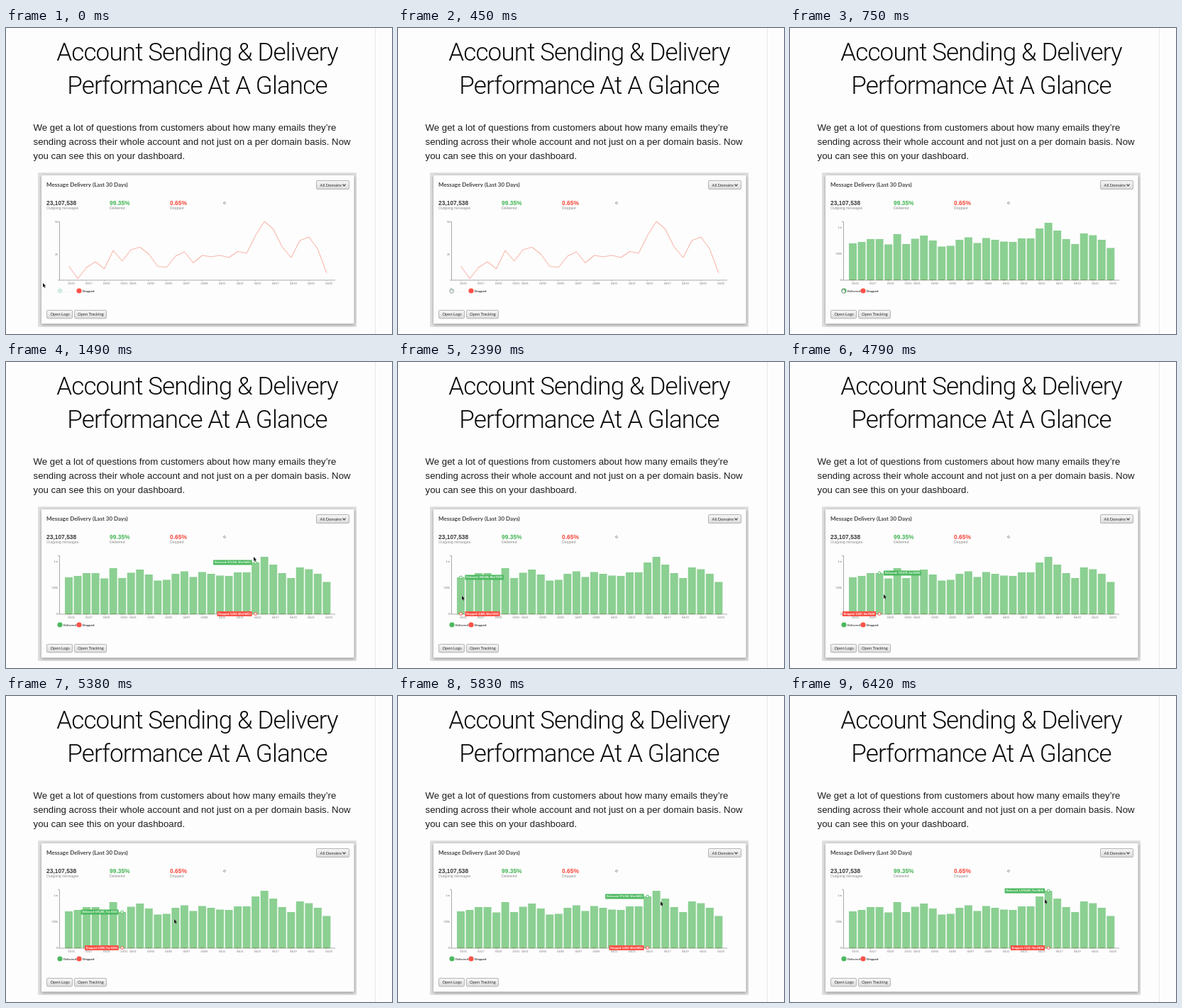
Recreate the animation shown at these times as an HTML page with a canvas. Size 544 px wide and 432 px high, loop 8 s.

```html
<!DOCTYPE html>
<html lang="en">
<head>
<meta charset="utf-8">
<title>Message delivery</title>
<style>
html, body { margin: 0; width: 100%; height: 100%; overflow: hidden; background: #fdfdfd; }
canvas { display: block; width: 544px; height: 432px; }
</style>
</head>
<body>
<canvas id="stage"></canvas>
<script>
const W = 544, H = 432, LOOP = 8000, STEP = 146.6, SWITCH = 750;
const SANS = '"Liberation Sans", Arial, sans-serif';
const LATO = 'Lato, sans-serif';
const GREEN = '#4cb95f', RED = '#fb5147';
const BASE = 355.5;

const canvas = document.getElementById('stage');
const ctx = canvas.getContext('2d');
const dpr = window.devicePixelRatio || 1;
canvas.width = W * dpr;
canvas.height = H * dpr;

const barTops = [304, 302, 298, 298, 305.5, 291, 305, 297.5, 293, 300, 308.5, 307.5, 299, 295.5, 303.5,
  296.5, 299, 301.5, 302, 297, 297, 283, 275, 286, 298, 305, 290, 292.5, 299, 310.5];
const linePoints = [336, 354, 338, 330, 340, 314, 329, 313, 309.5, 319, 336.5, 338, 322, 316, 331.5,
  321, 323, 321, 324, 315.5, 318, 293, 273, 284, 309, 324, 300, 295, 312, 346];
const barX = i => 88.5 + i * 12.53;

// Pointer legs: start time, steps, end x, end y, hovered bar (-1 for none)
const legs = [
  [0, 1, 52, 360, -1],
  [150, 3, 75, 368, -1],
  [1050, 1, 58, 364, -1],
  [1197, 1, 112, 345, 2],
  [1343, 2, 349, 275, 21],
  [2090, 1, 452, 240, 29],
  [2237, 1, 300, 368, 17],
  [2385, 1, 90, 330, 0],
  [2990, 3, 106, 328, 1],
  [3590, 1, 108, 326, 1],
  [3737, 3, 130, 328, 3],
  [4790, 1, 132, 328, 3],
  [4937, 4, 237, 315, 6],
  [5523, 3, 370, 290, 21],
  [5980, 1, 366, 290, 23],
  [6127, 3, 359, 287, 22]
];

function pointerAt(t) {
  const n = legs.findLastIndex(leg => leg[0] <= t);
  const [start, steps, ...to] = legs[n];
  const from = n ? legs[n - 1].slice(2) : to;
  const k = Math.min(steps, Math.floor((t - start) / STEP) + 1) / steps;
  const [x, y, bar] = to.map((v, i) => from[i] + (v - from[i]) * k);
  return { x, y, bar: Math.round(bar) };
}

function text(str, x, y, font, color, align = 'left', spacing = 0) {
  ctx.font = font;
  ctx.fillStyle = color;
  ctx.textAlign = align;
  ctx.letterSpacing = spacing + 'px';
  ctx.fillText(str, x, y);
}

function rect(x, y, w, h, color) {
  ctx.fillStyle = color;
  ctx.fillRect(x, y, w, h);
}

function path(points, color, width = 1) {
  ctx.beginPath();
  points.forEach(([x, y]) => ctx.lineTo(x, y));
  ctx.strokeStyle = color;
  ctx.lineWidth = width;
  ctx.stroke();
}

function dot(x, y, r, fill, stroke) {
  ctx.beginPath();
  ctx.arc(x, y, r, 0, Math.PI * 2);
  ctx.fillStyle = fill;
  ctx.fill();
  if (stroke) {
    ctx.strokeStyle = stroke;
    ctx.lineWidth = 1;
    ctx.stroke();
  }
}

function button(x, y, w, h, label, tx) {
  const shade = ctx.createLinearGradient(0, y, 0, y + h);
  shade.addColorStop(0, '#f8f8f8');
  shade.addColorStop(1, '#d9d9d9');
  ctx.beginPath();
  ctx.roundRect(x + 0.5, y + 0.5, w - 1, h - 1, 1.5);
  ctx.fillStyle = shade;
  ctx.fill();
  ctx.strokeStyle = '#b5b5b5';
  ctx.lineWidth = 1;
  ctx.stroke();
  text(label, tx, y + h / 2 + 2, '5.8px ' + LATO, '#333');
}

function drawPage() {
  rect(0, 0, W, H, '#fdfdfd');
  rect(520, 0, 1, H, '#e6e6e6');
  const title = '300 35px Roboto, sans-serif';
  text('Account Sending & Delivery', 269.5, 46, title, '#0c0c0c', 'center', -0.85);
  text('Performance At A Glance', 269.5, 93, title, '#0c0c0c', 'center', -0.85);
  ['We get a lot of questions from customers about how many emails they’re',
    'sending across their whole account and not just on a per domain basis. Now',
    'you can see this on your dashboard.'
  ].forEach((s, i) => text(s, 38.5, 144.5 + i * 20, '13.25px ' + SANS, '#1c1c1c'));
}

function drawPanel() {
  rect(45, 204, 449, 218, '#e1e1e1');
  ctx.save();
  ctx.shadowColor = 'rgba(0,0,0,.35)';
  ctx.shadowBlur = 4 * dpr;
  ctx.shadowOffsetY = dpr;
  rect(50, 208, 440.5, 209.5, '#fdfdfd');
  ctx.restore();

  text('Message Delivery (Last 30 Days)', 57, 223.5, 'bold 8px ' + LATO, '#444');
  button(437, 215, 47, 13, 'All Domains', 442.5);
  path([[474.5, 220.5], [476.5, 223], [478.5, 220.5]], '#333', 1.2);
  button(57, 398, 37, 12.5, 'Open Logs', 62.5);
  button(96, 398, 46, 12.5, 'Open Tracking', 101);

  [[57, '23,107,538', 'Outgoing messages', '#3c3c3c'],
    [146, '99.35%', 'Delivered', '#45b656'],
    [231, '0.65%', 'Dropped', '#f8463b']
  ].forEach(([x, value, label, color]) => {
    text(value, x, 250, 'bold 8.45px ' + SANS, color);
    text(label, x, 256, '5.1px ' + SANS, '#8a8a8a');
  });
  dot(308, 247, 1.5, '#f4f4f4', '#aaa');
}

function drawAxes(labels) {
  path([[73, 273.5], [75.5, 273.5], [75.5, 356], [73, 356]], '#aaa');
  path([[75.5, 356], [464, 356]], '#aaa');
  const font = '3.9px ' + SANS;
  labels.forEach(([s, y]) => text(s, 73, y + 1.5, font, '#777', 'right'));
  for (let i = 0; i < 16; i++) {
    const date = i < 4 ? '03/' + (25 + i * 2) : '04/' + String(i * 2 - 7).padStart(2, '0');
    const x = i < 4 ? 92 + i * 24.8 : 179 + (i - 4) * 25.1;
    rect(x - 3.5, 356, 0.8, 2, '#bbb');
    text(date, x, 362, font, '#777', 'center');
  }
}

function drawLegend(on) {
  const font = 'bold 4px ' + SANS;
  ctx.globalAlpha = on ? 1 : 0.25;
  dot(76, 371, 3.6, on ? GREEN : '#58b79b');
  text(on ? 'Delivered' : '– – – –', 81, 372.5, font, on ? '#444' : '#888');
  ctx.globalAlpha = 1;
  dot(103, 371, 3.6, RED);
  text('Dropped', 108, 372.5, font, '#333');
}

function drawLine() {
  drawAxes([['5k', 273], ['2k', 319]]);
  ctx.lineJoin = 'round';
  path(linePoints.map((y, i) => [barX(i), y]), '#f9b8ad', 1.1);
}

function drawBars() {
  drawAxes([['1m', 281], ['500k', 318], ['0', 355.5]]);
  barTops.forEach((top, i) => {
    rect(barX(i) - 5.5, top, 11, 356 - top, '#8bd092');
    rect(barX(i) - 4, 355, 8, 1, '#7d9f62');
  });
}

function drawTip(label, x, y, color) {
  ctx.font = 'bold 3.6px ' + SANS;
  ctx.letterSpacing = '0px';
  const w = ctx.measureText(label).width + 3.6;
  const left = x - 5 - w < 70 ? x + 6 : x - 5 - w;
  rect(left, y - 3.5, w, 7, color);
  text(label, left + 1.8, y + 1.3, ctx.font, '#fff');
  dot(x, y, 1.9, '#fff', color);
}

function drawTips(i) {
  const days = ['Wed', 'Thu', 'Fri', 'Sat', 'Sun', 'Mon', 'Tue'];
  const date = i < 7 ? '03/' + (25 + i) : '04/' + String(i - 6).padStart(2, '0');
  const day = days[i % 7] + ' ' + date;
  const sent = Math.round((BASE - barTops[i]) * 13387 + i * 37 + 215);
  const lost = Math.round(1000 + (356 - linePoints[i]) * 73 + i * 3);
  drawTip(`Delivered: ${sent.toLocaleString('en-US')}, ${day}`, barX(i), barTops[i], GREEN);
  drawTip(`Dropped: ${lost.toLocaleString('en-US')}, ${day}`, barX(i), BASE, RED);
}

function drawPointer(x, y, hand) {
  ctx.save();
  ctx.translate(x, y);
  ctx.beginPath();
  if (hand) {
    ctx.roundRect(-1.7, 1.5, 4.4, 4.5, 1.5);
    ctx.roundRect(-0.6, 0, 1.3, 4, 0.6);
  } else {
    [[0, 0], [0, 6], [1.4, 4.8], [2.4, 7], [3.3, 6.6], [2.4, 4.5], [4.2, 4.3]]
      .forEach(([px, py]) => ctx.lineTo(px, py));
    ctx.closePath();
  }
  ctx.lineWidth = 0.8;
  ctx.strokeStyle = hand ? '#333' : 'rgba(255,255,255,.7)';
  ctx.stroke();
  ctx.fillStyle = hand ? '#e8f0ea' : '#1a1a1a';
  ctx.fill();
  ctx.restore();
}

function draw(t) {
  const pointer = pointerAt(t);
  const bars = t >= SWITCH;
  ctx.setTransform(dpr, 0, 0, dpr, 0, 0);
  drawPage();
  drawPanel();
  if (bars) drawBars(); else drawLine();
  drawLegend(bars);
  if (pointer.bar >= 0) drawTips(pointer.bar);
  const onLegend = Math.hypot(pointer.x - 76, pointer.y - 371) < 4;
  drawPointer(pointer.x, pointer.y, onLegend);
}

const begin = performance.now();
function tick() {
  draw((performance.now() - begin) % LOOP);
  requestAnimationFrame(tick);
}
tick();
</script>
</body>
</html>
```
